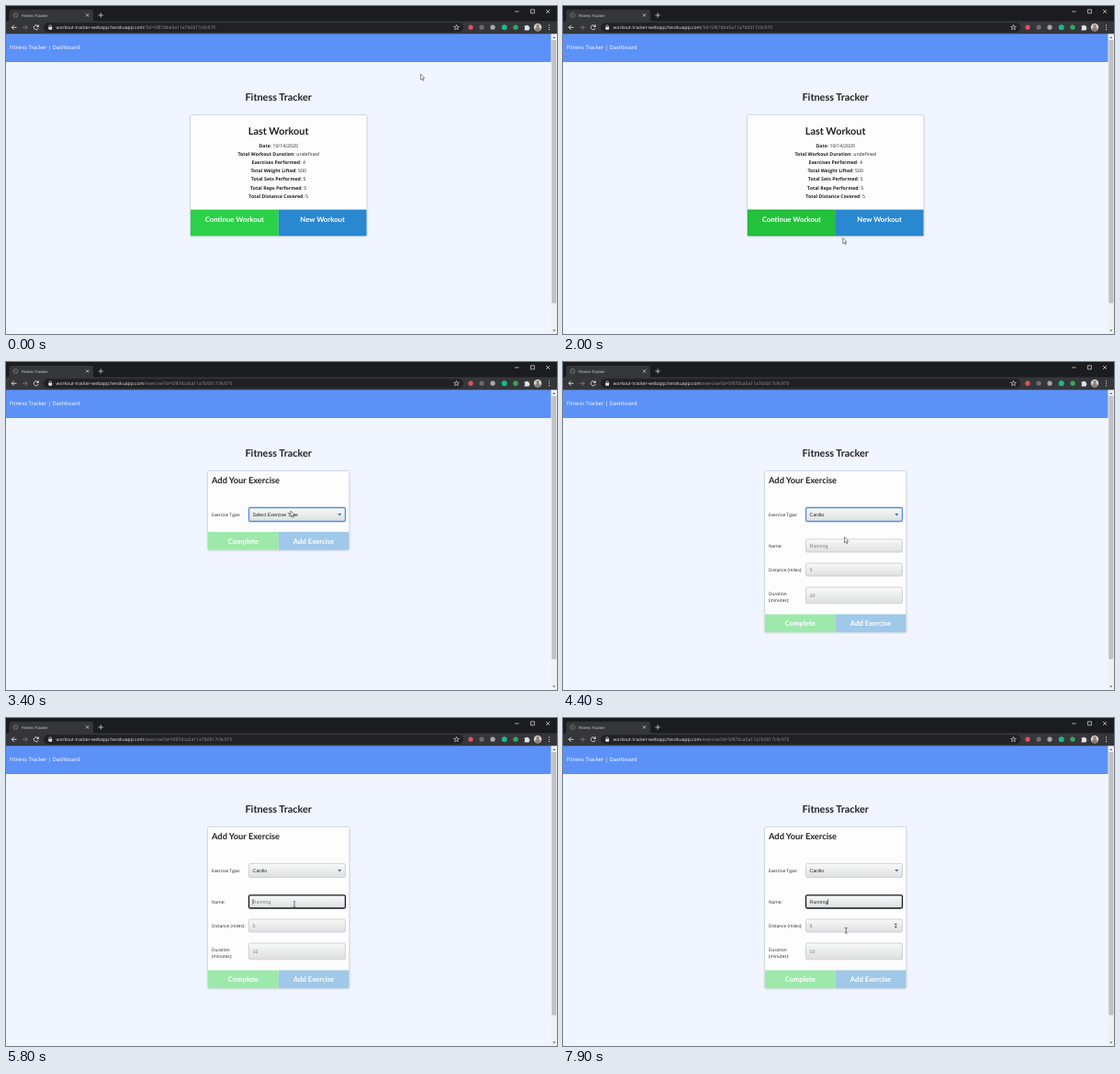
These frames come from a looping animation (600 px wide and 357 px high, 8 s). An HTML page:

```html
<!DOCTYPE html>
<html lang="en">
<head>
<meta charset="utf-8">
<title>Fitness Tracker</title>
<style>
html, body { margin: 0; width: 100%; height: 100%; overflow: hidden; background: #f0f5ff; }
svg { display: block; width: 100vw; height: 100vh; }
text { font-family: "Open Sans", "Noto Sans", sans-serif; font-size: 4.8px; fill: #222; white-space: pre; text-rendering: geometricPrecision; }
.b, .h, .btn { font-weight: 700; }
.h, .btn { font-family: Lato, sans-serif; }
.btn { font-size: 7.75px; fill: #fff; }
.mid { text-anchor: middle; }
.stats text { font-size: 5.2px; }
.val { font-family: "Liberation Sans", Arial, sans-serif; font-size: 5.3px; }
.ph { fill: #7b7b7b; }
.card { fill: #fdfdfe; filter: drop-shadow(0 .5px .8px #0005); }
.field rect { fill: url(#field); stroke: #b9babc; stroke-width: .6; }
.line { fill: none; stroke: #e3e4e6; stroke-width: .9; }
.focus { fill: none; stroke: #0007; stroke-width: .5; stroke-dasharray: 1 1; }
</style>
</head>
<body>
<svg viewBox="0 0 600 357" preserveAspectRatio="none">
<defs>
  <linearGradient id="field" x2="0" y2="1">
    <stop stop-color="#f9f9f9"/><stop offset="1" stop-color="#dedfe0"/>
  </linearGradient>
</defs>

<!-- browser window -->
<rect width="600" height="17" fill="#1b1c1f"/>
<path d="M0 16.5H2Q3.5 16.5 3.5 14V6Q3.5 4 5.5 4H93Q95 4 95 6V14Q95 16.5 97 16.5H600V31H0Z" fill="#35363a"/>
<rect x="41" y="18.2" width="457" height="10.2" rx="5.1" fill="#202124"/>
<g id="globe" fill="none" stroke="#777a7e" stroke-width=".8"><circle cx="10.5" cy="10" r="2.5"/><path d="M8.8 8.2l3.4 3.6"/></g>
<path id="spinner" d="M10.5 7.5a2.5 2.5 0 0 1 0 5" fill="none" stroke="#e3e4e6" stroke-width=".8"/>
<text x="17" y="11.6" style="font-size:4.15px;fill:#e3e4e6">Fitness Tracker</text>
<g class="line">
  <path d="M87 8.4l3.2 3.2m0-3.2l-3.2 3.2M100.5 10h5.4m-2.7-2.7v5.4" stroke-width=".7"/>
  <path d="M11.5 23.3H6.2m2.5-2.5l-2.5 2.5l2.5 2.5"/>
  <path d="M18 23.3h5.3m-2.5-2.5l2.5 2.5l-2.5 2.5" stroke="#77797c"/>
  <path id="reload" d="M35 22a2.5 2.5 0 1 0 .2 2.2M35.4 20.4v2.1h-2.1"/>
  <path id="stop" d="M30.8 21.2l4.2 4.2m0-4.2l-4.2 4.2"/>
  <path d="M47 23v-1a1.2 1.2 0 0 1 2.4 0v1" stroke-width=".6"/>
  <path d="M554 6h4.5M571.4 3.9h4v4h-4zM588 4l4 4m0-4l-4 4" stroke-width=".7"/>
  <path d="M490.5 20.4l.8 2h2.1l-1.7 1.3l.7 2.1l-1.9-1.3l-1.9 1.3l.7-2.1l-1.7-1.3h2.1z" stroke-width=".6"/>
</g>
<rect x="46.3" y="22.8" width="3.8" height="2.9" rx=".4" fill="#e3e4e6"/>
<text x="54.5" y="25.2" style="font-size:5px;fill:#e9eaed">workout-tracker-webapp.herokuapp.com<tspan id="path" fill="#92959a"></tspan></text>
<circle cx="506" cy="23.2" r="2.6" fill="#e0525c"/>
<circle cx="518" cy="23.2" r="2.6" fill="#696b6f"/>
<circle cx="530" cy="23.2" r="2.6" fill="#a5a7aa"/>
<circle cx="542.7" cy="23.2" r="3" fill="#18b98a"/>
<circle cx="555" cy="23.2" r="2.7" fill="#35a566"/>
<path d="M564.6 21.5h1.5a1.1 1.1 0 0 1 2.1 0h1.4v1.6a1.1 1.1 0 0 1 0 2.1v1.2h-5v-1.4a1.1 1.1 0 0 0 0-2z" fill="#e3e4e6"/>
<circle cx="579" cy="23.2" r="4.2" fill="#d6d3ce"/>
<path d="M576 26a3 3 0 0 1 6 0a4.2 4.2 0 0 1-6 0" fill="#8a807a"/><circle cx="579" cy="21.6" r="1.6" fill="#8a807a"/>
<path d="M591.5 20.8v.1m0 2.3v.1m0 2.3v.1" stroke="#e3e4e6" stroke-linecap="round" stroke-width="1.1"/>

<!-- page -->
<rect y="30.3" width="594" height="30.7" fill="#5c92f8"/>
<text x="4" y="46.7" style="font-size:5.83px;fill:#fff">Fitness Tracker | Dashboard</text>
<rect x="593.5" y="30.3" width="6.5" height="326.7" fill="#f1f1f1"/>
<rect x="594.3" y="37" width="5" height="286.5" fill="#c1c1c1"/>
<path d="M595.3 35l1.5-1.7l1.5 1.7zM595.3 352.5l1.5 1.7l1.5-1.7z" fill="#555"/>
<text class="h mid" x="296.7" y="103" style="font-size:10.9px">Fitness Tracker</text>

<g id="dashboard">
  <rect class="card" x="201" y="119" width="191.6" height="131.3" rx="1"/>
  <text class="h mid" x="296.6" y="139.5" style="font-size:10.9px">Last Workout</text>
  <g class="stats" id="stats"></g>
  <rect id="resume" x="201" y="221.6" width="95.8" height="28.7"/>
  <rect id="fresh" x="296.8" y="221.6" width="95.8" height="28.7"/>
  <rect id="resumeFocus" class="focus" x="201.4" y="222" width="95" height="27.9"/>
  <rect id="freshFocus" class="focus" x="297.2" y="222" width="95" height="27.9"/>
  <text class="btn mid" x="248.9" y="234.6">Continue Workout</text>
  <text class="btn mid" x="344.6" y="234.6">New Workout</text>
</g>

<g id="exercise">
  <rect id="sheet" class="card" x="220" y="119" width="153.5" rx="1"/>
  <text class="h" x="224" y="131.9" style="font-size:9.3px">Add Your Exercise</text>
  <text x="224" y="168.2">Exercise Type:</text>
  <g class="field">
    <rect id="select" x="264.5" y="158.5" width="105" height="15" rx="1.5"/>
    <text id="kind" class="val" x="268.6" y="168.1"></text>
    <path d="M361.3 165h4l-2 2.2z" fill="#2b62a0"/>
  </g>
  <g id="details" class="field">
    <text x="224" y="202">Name:</text>
    <text x="224" y="228.2">Distance (miles):</text>
    <text x="224" y="254.2">Duration</text>
    <text x="224" y="261.4">(minutes):</text>
    <rect id="name" x="264.5" y="192.8" width="105" height="14.2" rx="1.5"/>
    <rect x="264.5" y="219" width="105" height="14" rx="1.5"/>
    <rect x="264.5" y="245" width="105" height="17.8" rx="1.5"/>
    <text id="typed" class="val" x="268.6" y="201.9"></text>
    <path id="caret" stroke="#111" stroke-width=".5"/>
    <text class="val ph" x="268.6" y="228">5</text>
    <text class="val ph" x="268.6" y="255.8">10</text>
    <path id="stepper" d="M360.7 225.3l1.6-1.9l1.6 1.9zM360.7 226.7l1.6 1.9l1.6-1.9z" fill="#444"/>
  </g>
  <g id="actions">
    <rect x="220" width="76.8" height="19.7" fill="#9de9ab"/>
    <rect x="296.8" width="76.7" height="19.7" fill="#a0c8e8"/>
    <text class="btn mid" x="258.3" y="12.9">Complete</text>
    <text class="btn mid" x="335" y="12.9">Add Exercise</text>
  </g>
</g>

<g id="pointer">
  <path id="arrow" d="M0 0V6.2L1.4 5L2.4 7.2L3.4 6.8L2.5 4.6H4.3Z" fill="#fff" stroke="#222" stroke-width=".5"/>
  <path id="hand" d="M-.6 .4Q0-.4.6 .4V2.2L2.6 2.7V4.5L2 6.2H-.7L-1.9 3.8L-1.4 3.3L-.6 3.9Z" fill="#fff" stroke="#222" stroke-width=".5"/>
  <path id="beam" d="M-1.4-2.9H-.4L0-2.5L.4-2.9H1.4M-1.4 2.9H-.4L0 2.5L.4 2.9H1.4M0-2.5V2.5" fill="none" stroke="#222" stroke-width=".6"/>
</g>
</svg>
<script>
const $ = id => document.getElementById(id);
const show = (id, on) => $(id).style.display = on ? "" : "none";
const set = (id, attrs) => { for (const k in attrs) $(id).setAttribute(k, attrs[k]); };

const stats = [["Date", "10/14/2020"], ["Total Workout Duration", "undefined"],
  ["Exercises Performed", 4], ["Total Weight Lifted", 500], ["Total Sets Performed", 5],
  ["Total Reps Performed", 5], ["Total Distance Covered", 5]];
$("stats").innerHTML = stats.map(([k, v], i) =>
  `<text class="mid" x="296.7" y="${153.6 + i * 9.2}"><tspan class="b">${k}</tspan>: ${v}</text>`).join("");

// pointer stops: time, x, y
const stops = [[0, 451.5, 74], [300, 451.5, 74], [1000, 262, 238], [1700, 264, 238], [2000, 304.7, 252.3],
  [2300, 353.7, 234.3], [2700, 353.7, 234.3], [3200, 310, 162], [3700, 310, 162], [4100, 306.5, 190.5],
  [5100, 306.5, 190.5], [5400, 313, 202], [6200, 315, 203.4], [7300, 315, 203.4], [7800, 308.3, 231.3], [8000, 308.3, 231.3]];
const keys = [6300, 6400, 6500, 6700, 6800, 7000, 7200];

function pointerAt(t) {
  const i = stops.findIndex(s => s[0] > t);
  const [t0, x0, y0] = stops[i - 1], [t1, x1, y1] = stops[i];
  const u = (t - t0) / (t1 - t0), e = u * u * (3 - 2 * u);
  return [x0 + (x1 - x0) * e, y0 + (y1 - y0) * e];
}

function draw(t) {
  const [x, y] = pointerAt(t);
  const home = t < 2800, open = t >= 4200, editing = t >= 5400;
  const over = (l, r, top, bottom) => x > l && x < r && y > top && y < bottom;
  show("dashboard", home);
  show("exercise", !home);

  const loading = t >= 2400 && home;
  show("globe", !loading);
  show("spinner", loading);
  show("reload", !loading);
  show("stop", loading);
  set("spinner", { transform: `rotate(${(t - 2500) * .36} 10.5 10)` });
  $("path").textContent = t < 2400 ? "/?id=5f87dbe5a11a7b0017c9c970"
    : t < 2900 ? "/exercise" : "/exercise?id=5f87dca5a11a7b0017c9c975";

  const onResume = home && over(201, 297, 222, 250), onFresh = home && over(297, 393, 222, 250);
  const resumeFocus = t >= 1500 && t < 2300, freshFocus = t >= 2300;
  show("resumeFocus", resumeFocus);
  show("freshFocus", freshFocus);
  set("resume", { fill: onResume || resumeFocus ? "#22c23b" : "#2bd148" });
  set("fresh", { fill: onFresh || freshFocus ? "#1670b4" : "#2988cf" });

  set("sheet", { height: open ? 175.2 : 85.6 });
  set("actions", { transform: `translate(0 ${open ? 274.5 : 184.9})` });
  show("details", open);
  $("kind").textContent = open ? "Cardio" : "Select Exercise Type";
  const picked = t >= 3300 && !editing;
  $("select").style.cssText = picked ? "stroke:#4b8fe0;stroke-width:1.3" : "";
  $("name").style.cssText = editing ? "stroke:#14161a;stroke-width:1.3" : "";

  const count = keys.filter(k => k <= t).length;
  $("typed").textContent = count ? "Running".slice(0, count) : "Running";
  $("typed").style.fill = count ? "" : "#7b7b7b";
  const caretX = 268.8 + (count ? $("typed").getComputedTextLength() : 0);
  set("caret", { d: `M${caretX} 197v6` });
  show("caret", editing && (count || (t - 5400) % 1000 < 500));
  show("stepper", over(264, 370, 219, 233));

  const hand = onResume || onFresh;
  const beam = open && (over(264, 370, 193, 207) && editing || over(264, 370, 219, 233));
  show("hand", hand);
  show("beam", beam);
  show("arrow", !hand && !beam);
  set("pointer", { transform: `translate(${x} ${y})` });
}

function tick() {
  draw(Math.floor(performance.now() % 8000 / 100) * 100);
  requestAnimationFrame(tick);
}
tick();
</script>
</body>
</html>
```
